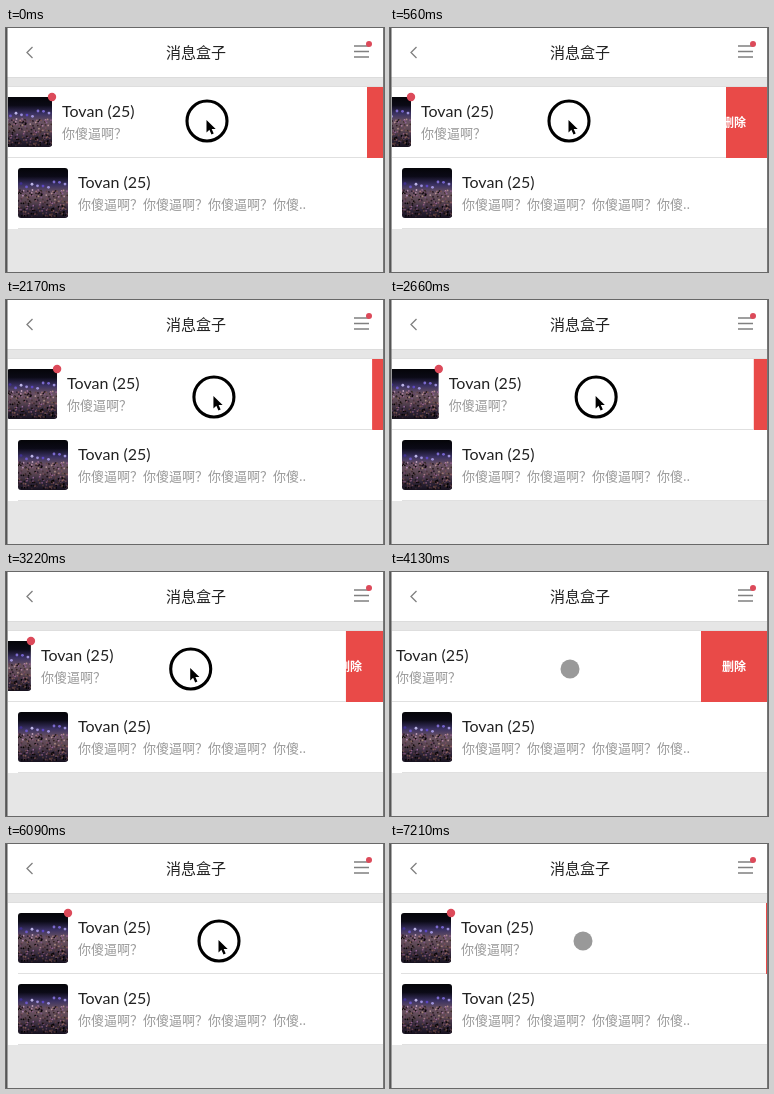
An HTML page with a canvas that plays this animation: 378 by 244 pixels, repeating every 7280 ms.

```html
<!DOCTYPE html>
<html lang="zh-CN">
<head>
<meta charset="utf-8">
<title>消息盒子</title>
<style>
html, body { margin: 0; width: 378px; height: 244px; overflow: hidden; }
canvas { display: block; }
</style>
</head>
<body>
<canvas id="stage" width="378" height="244"></canvas>
<script>
const ctx = document.getElementById('stage').getContext('2d');
const LOOP = 7280, STEP = 70;
const LEFT = 2, RIGHT = 377, BUTTON = 66;
const RED = '#e94a48', BADGE = '#dc4a5a', GRAY = '#808080';
const CJK = '"Noto Sans CJK SC", "Noto Sans CJK", sans-serif';
const LATIN = 'Lato, sans-serif';

// Turning points of the drag: time, pointer x, row offset
const TURNS = [
  [0, 201, 16], [1120, 157, BUTTON], [1260, 157, BUTTON], [2350, 218, 0],
  [3500, 174, 49], [3780, 174, BUTTON], [4480, 186, BUTTON], [4900, 213, 39],
  [5000, 213, 39], [5530, 213, 0], [6090, 213, 0], [6580, 172, 41],
  [6930, 193, 20], [7210, 193, 1], [LOOP, 193, 1]
];
// Spans in which the finger is lifted
const LIFTS = [[3570, 4340], [5000, 5670], [7000, LOOP]];

const mix = (a, b, u) => a + (b - a) * u;
const ramp = (time, start, length) => Math.min(1, Math.max(0, (time - start) / length));

function poseAt(time) {
  const i = TURNS.findIndex(turn => turn[0] > time);
  const [t0, x0, offset0] = TURNS[i - 1], [t1, x1, offset1] = TURNS[i];
  const u = ramp(time, t0, t1 - t0);
  // With the pointer at rest the row settles by itself
  const settle = x0 === x1 ? 1 - (1 - u) ** 3 : u;
  const lifted = LIFTS.map(([up, down]) => ramp(time, up, 210) - ramp(time, down, 210));
  return {
    x: mix(x0, x1, u),
    y: mix(93, 97, ramp(time, 700, 1400)),
    offset: mix(offset0, offset1, settle),
    press: 1 - Math.max(...lifted)
  };
}

function rect(x, y, w, h, color) {
  ctx.fillStyle = color;
  ctx.fillRect(x, y, w, h);
}

function disc(x, y, r, color) {
  ctx.fillStyle = color;
  ctx.beginPath();
  ctx.arc(x, y, r, 0, 7);
  ctx.fill();
}

function text(value, x, y, font, color, align = 'left') {
  ctx.font = font;
  ctx.fillStyle = color;
  ctx.textAlign = align;
  ctx.fillText(value, x, y);
}

// A dark hall: stage lights above a pale crowd
function avatar(x, y) {
  ctx.save();
  ctx.translate(x, y);
  ctx.beginPath();
  ctx.roundRect(0, 0, 50, 50, 3);
  ctx.clip();
  const shade = ctx.createLinearGradient(0, 0, 0, 50);
  ['#050509', '#0b0a16', '#3a3162', '#6a5362', '#5a4652', '#30263a', '#17121f']
    .forEach((color, i) => shade.addColorStop(i / 6, color));
  rect(0, 0, 50, 50, shade);
  let seed = 7;
  const random = () => (seed = seed * 16807 % 2147483647) / 2147483647;
  for (let i = 0; i < 260; i++) {
    const depth = random();
    const light = mix(75, 35, depth) * random();
    disc(random() * 50, 22 + depth * 27, .9, `hsl(${mix(290, 380, random())} 20% ${light}%)`);
  }
  for (let i = 0; i < 9; i++) {
    disc(3 + i * 5.5, 14 + random() * 6, 1.4, `hsl(250 50% ${mix(35, 85, random())}%)`);
  }
  ctx.restore();
}

function row(y, message, offset, unread) {
  ctx.save();
  ctx.translate(-offset, y);
  rect(LEFT, 0, RIGHT - LEFT, 71, '#fff');
  rect(12, 70, RIGHT - 12, 1, '#e0e0e0');
  avatar(12, 10);
  if (unread) disc(62, 10, 4.2, BADGE);
  text('Tovan (25)', 72, 30, '16px ' + LATIN, '#222');
  text(message, 72, 51, '500 13px ' + CJK, '#999');
  ctx.restore();
}

function header() {
  rect(0, 0, 378, 49, '#fff');
  rect(0, 49, 378, 1, '#dcdcdc');
  ctx.strokeStyle = GRAY;
  ctx.lineWidth = 1.3;
  ctx.stroke(new Path2D('M26.5 19L21 24.5L26.5 30M348 18H363M348 23.5H363M348 29H363'));
  text('消息盒子', 190, 30, '15px ' + CJK, '#222', 'center');
  disc(363, 16, 3, BADGE);
}

// A gray dot that opens into a ring with an arrow while pressed
function pointer(x, y, press) {
  const radius = mix(9.5, 20, press);
  ctx.globalAlpha = 1 - press;
  disc(x, y, radius, '#999');
  ctx.globalAlpha = press;
  ctx.strokeStyle = '#000';
  ctx.lineWidth = 3.1;
  ctx.beginPath();
  ctx.arc(x, y, radius, 0, 7);
  ctx.stroke();
  ctx.save();
  ctx.translate(x - .5, y - 1);
  const arrow = new Path2D('M0 0V12.5L2.9 9.8L5 14.5L7.2 13.5L5.2 9H9.2Z');
  ctx.lineWidth = 1.6;
  ctx.strokeStyle = '#fff';
  ctx.stroke(arrow);
  ctx.fillStyle = '#000';
  ctx.fill(arrow);
  ctx.restore();
  ctx.globalAlpha = 1;
}

function draw(time) {
  const { x, y, offset, press } = poseAt(time);
  const phrase = '你傻逼啊？';
  rect(0, 0, 378, 244, '#e6e6e6');
  header();
  rect(LEFT, 58, RIGHT - LEFT, 1, '#dedede');

  ctx.save();
  ctx.beginPath();
  ctx.rect(LEFT, 0, RIGHT - LEFT, 244);
  ctx.clip();
  rect(RIGHT - BUTTON, 59, BUTTON, 71, RED);
  text('删除', RIGHT - BUTTON / 2, 99, 'bold 12px ' + CJK, '#fff', 'center');
  row(59, phrase, offset, true);
  row(130, phrase.repeat(3) + '你傻..', 0, false);
  ctx.restore();

  rect(0, 0, 1.5, 244, '#555');
  rect(377, 0, 1, 244, '#777');
  pointer(x, y, press);
}

function tick() {
  draw(Math.floor(performance.now() % LOOP / STEP) * STEP);
  requestAnimationFrame(tick);
}
tick();
</script>
</body>
</html>
```
